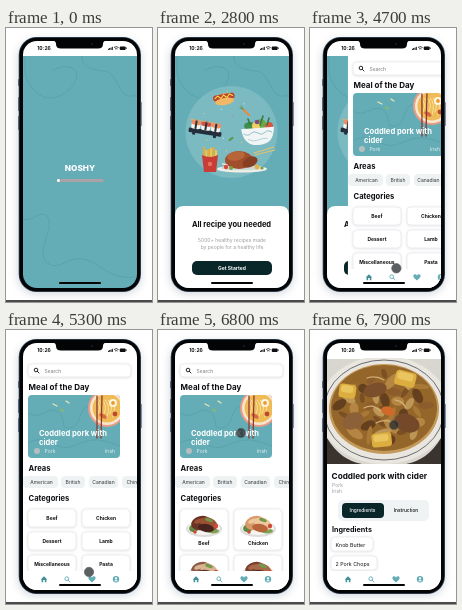
An HTML page that plays this animation: 146 px wide and 274 px high, repeating every 8 s.

```html
<!DOCTYPE html>
<html lang="en">
<head>
<meta charset="utf-8">
<style>
html, body { margin: 0; width: 100%; height: 100%; overflow: hidden; background: #fff }
svg { display: block; width: 100%; height: 100% }
text { font-family: Inter, "Open Sans", sans-serif }
</style>
</head>
<body>
<svg id="stage" viewBox="0 0 146 274"></svg>
<script>
const TEAL = '#64adb6', DARK = '#092629', INK = '#0d0f12', GREY = '#9a9ca0';

// Markup helpers
const rect = (x, y, w, h, r, fill, more = '') =>
  `<rect x="${x}" y="${y}" width="${w}" height="${h}" rx="${r}" fill="${fill}" ${more}/>`;
const dot = (x, y, r, fill, more = '') => `<circle cx="${x}" cy="${y}" r="${r}" fill="${fill}" ${more}/>`;
const oval = (x, y, rx, ry, fill, turn = 0) =>
  `<ellipse cx="${x}" cy="${y}" rx="${rx}" ry="${ry}" fill="${fill}" transform="rotate(${turn} ${x} ${y})"/>`;
const shape = (d, fill) => `<path d="${d}" fill="${fill}"/>`;
const line = (d, color, width = 1, more = '') =>
  `<path d="${d}" fill="none" stroke="${color}" stroke-width="${width}" stroke-linecap="round" ${more}/>`;
const text = (x, y, s, size, fill = INK, weight = 400, anchor = 'start') =>
  `<text x="${x}" y="${y}" font-size="${size}" fill="${fill}" font-weight="${weight}" text-anchor="${anchor}">${s}</text>`;
const mid = (x, y, s, size, fill, weight) => text(x, y, s, size, fill, weight, 'middle');
const group = (id, body, more = '') => `<g id="${id}" ${more}>${body}</g>`;
const dashes = d => line(d, '#4b929c', .5, 'stroke-dasharray="1.6 1.3"');

const upperCurves = dashes('M19 29C17 46 22 62 38 69C54 73 69 60 71 48C71 38 58 36 48 42') +
  dashes('M76 28C75 39 88 42 98 43C111 45 111 62 120 67C125 69 128 68 131 66');
const lowerCurves = dashes('M17 191C26 194 31 184 39 187C49 192 38 211 37 224C37 236 47 240 56 236C70 229 79 229 91 237C103 245 113 251 131 249');

function splash() {
  return rect(17, 28, 114, 232, 0, TEAL) + upperCurves + lowerCurves +
    mid(74, 143, 'NOSHY', 8.2, '#fff', 800) +
    rect(51, 151, 46.5, 3, 1, '#aaa3a5') +
    rect(51, 151, 3, 3, 1, '#f7f7f7', 'id="bar"');
}

function hotdog() {
  return `<g transform="rotate(-10 66 70)">` + oval(66, 71, 10, 5.5, '#e7a04b') +
    rect(55, 66, 22, 6, 3, '#b9452f') + oval(66, 73.5, 9.5, 3.6, '#f2b865') +
    line('M57 69l3-2 3 3 3-3 3 3 3-3 3 2', '#fbd748', 1.1) + '</g>';
}

function sushi() {
  let s = `<g transform="rotate(9 48 101)">` + rect(31, 102, 33, 4.5, 1, '#232d3b') + rect(35, 106, 3, 2.5, 0, '#232d3b') + rect(56, 106, 3, 2.5, 0, '#232d3b');
  for (let i = 0; i < 3; i++) {
    const x = 33 + i * 10;
    s += rect(x, 96, 9, 6.5, 2, '#f8f5ee') + rect(x - .5, 93.5, 10, 5, 2.4, i == 1 ? '#d94f40' : '#ef8e63') +
      rect(x + 3.5, 93.5, 2, 9, 0, '#2a333c');
  }
  return s + '</g>' + line('M32 91L61 96', '#d9b376', .8);
}

function salad() {
  return oval(92, 98, 6, 4, '#3f8c4c') + oval(103, 96, 5, 5, '#66a843', 25) + oval(111, 98, 4, 4, '#d9573c') +
    dot(98, 98, 4, '#f2cf62') + line('M102 97l3-9M109 97l2-7M92 96l-2-5', '#397744', 1.6) +
    dot(99, 94, 2.3, '#87477d') +
    `<g transform="rotate(-4 100 107)">` + shape('M83.5 100H116.5C115.5 113 110 117 100 117S85 112 83.5 100Z', '#f2f5f5') +
    line('M86 105q4 3 7 0t7 0 7 0 7 0', '#8fbac4', .9) + line('M90 111q5 3 10 1t9-1', '#a9cbd2', .8) + '</g>';
}

function fries() {
  let s = '';
  for (let i = 0; i < 6; i++) s += rect(47 + i * 2.4, 119 + (i * 7 % 4), 2, 13, .4, i % 2 ? '#f5c84c' : '#e9ad36');
  return s + shape('M46 127Q54 131 62 127L60 144H48Z', '#c83d35') + dot(54, 136, 2.2, '#e5735e');
}

function roast() {
  return oval(84, 141, 25, 3.6, '#f1eee7') + oval(84, 140, 21, 2.3, '#cddbd8') +
    oval(81, 132, 14, 9, '#a04e2b') + oval(78, 128, 9, 4.5, '#b9653a', -10) + oval(92, 134, 8, 5, '#873f24', -25) +
    line('M69 137l-4-1', '#f3e4cd', 1.8) + dot(68, 139, 2.2, '#d6483b') + dot(73, 140, 2, '#76a342') + dot(99, 139, 2.4, '#e4b244') + dot(104, 140, 1.6, '#76a342');
}

function welcome() {
  let crumbs = '';
  for (let i = 0; i < 16; i++) {
    const a = i * 2.4, r = 10 + i * 1.9;
    crumbs += dot(74 + r * Math.cos(a), 102 + r * Math.sin(a), .6, ['#f2cf62', '#dcecec', '#e86a4a'][i % 3]);
  }
  return rect(17, 28, 114, 232, 0, TEAL) + upperCurves +
    dot(73.5, 104, 46, '#7bbac1') + crumbs + hotdog() + sushi() + salad() +
    `<g transform="translate(-2 0)">${fries()}</g>` + roast() +
    line('M91 87L85 81', '#ec8a40', 2) + line('M85 81l-2-3M85 81l-3-1', '#58934a') +
    line('M96 125L116 119M97 127L117 122', '#e8c46a', 1) + oval(73, 111, 3, 1.3, '#5c9b50', -35) +
    shape('M17 260V187Q17 178 26 178H122Q131 178 131 187V260Z', '#fff') +
    mid(73.5, 199, 'All recipe you needed', 7.5, INK, 700) +
    mid(74, 213.5, '5000+ healthy recipes made', 5, GREY) +
    mid(74, 220.5, 'by people for a healthy life', 5, GREY) +
    rect(34, 233, 80, 14, 5, DARK) + mid(74, 242, 'Get Started', 5, '#fff', 700);
}

function nav() {
  return rect(17, 241, 114, 19, 0, '#fff') +
    shape('M34.7 249.5L38 246.3L41.3 249.5H40.4V252.3H38.8V250H37.2V252.3H35.6V249.5Z', '#438e99') +
    dot(60.8, 248.7, 1.9, 'none', `stroke="${TEAL}" stroke-width=".9"`) + line('M62.2 250.2L64 252', TEAL, .9) +
    shape('M86 252.4C79 247.8 84 244.6 86 247.4C88 244.6 93 247.8 86 252.4Z', TEAL) +
    dot(110, 249.3, 3.2, TEAL) + dot(110, 248.4, 1.1, '#fff') + shape('M108 251.3Q110 248.8 112 251.3Z', '#fff');
}

function noodles() {
  let s = dot(101, 78, 19, '#e79c86') + dot(101, 78, 17, '#f7e6d2') + dot(101, 78, 14.5, '#eebb56');
  for (let i = 0; i < 6; i++) s += line(`M${90 + i * 3} 70q6 5 2 ${14 + i % 2 * 3}`, '#fae19a', 1);
  return s + dot(107, 73, 4, '#fff5df') + dot(107, 73, 1.9, '#ee9b2e') + oval(97, 86, 4, 2, '#d9673f', 30) +
    dot(109, 84, 2.4, '#bc4a32') + line('M91 66L91 108M96 66L95 108', '#8a3830', 1.3) +
    line('M47 74l4 2M60 71l3 2', '#f3e6b0', 1.2) + oval(56, 80, 2, 1, '#8fbb5c', 30);
}

const card = (x, y, w, h) => rect(x, y, w, h, 4, '#fff', 'stroke="#e6e7ea" stroke-width=".7" filter="url(#soft)"');

function dish(x, y, i) {
  const tones = [['#6b3326', '#9a5233', '#47251e'], ['#d99a6a', '#edc79c', '#b8653c'],
    ['#8a5a44', '#d8b493', '#5a2f27'], ['#7a4030', '#a8684a', '#542a24']][i];
  return oval(x, y + 4, 18, 8, '#dedddb') + oval(x, y + 3, 16, 7, '#f6f5f2') +
    oval(x - 10, y + 3, 5, 4, '#5f8a42', -20) + oval(x + 9, y + 6, 6, 2.5, '#7fa352') +
    oval(x - 3, y - 2, 10, 7, tones[0], -15) + oval(x + 5, y - 1, 9, 6, tones[1], 25) +
    oval(x + 2, y + 3, 8, 4, tones[2], 10) + oval(x - 5, y - 4, 5, 2, tones[1], -20) +
    oval(x + 5, y - 5, 4, 1.6, '#6f9a4a', 20) + dot(x + 12, y + 1, 2.2, '#cf4a38') + dot(x - 9, y + 7, 1.8, '#cf4a38');
}

function home() {
  const names = ['Beef', 'Chicken', 'Dessert', 'Lamb', 'Miscellaneous', 'Pasta'];
  const chips = [['American', 17, 35], ['British', 55, 24], ['Canadian', 83, 29], ['Chinese', 116, 28]];
  const column = i => i % 2 ? 76 : 22, row = i => i >> 1;
  const compact = names.map((s, i) => {
    const x = column(i), y = 179 + row(i) * 23;
    return card(x, y, 48, 18) + mid(x + 24, y + 11, s, 5, INK, 700);
  }).join('');
  const full = names.slice(0, 4).map((s, i) => {
    const x = column(i), y = 179 + row(i) * 46;
    return card(x, y, 48, 41) + dish(x + 24, y + 16, i) + mid(x + 24, y + 36.2, s, 5, INK, 700);
  }).join('');
  return rect(17, 28, 114, 232, 0, '#fff') +
    card(22, 34, 103, 13) + dot(30, 40, 1.8, 'none', `stroke="${INK}" stroke-width=".9"`) + line('M31.4 41.4L33 43', INK, .9) +
    text(38.5, 42.8, 'Search', 5, '#777b80') +
    text(22.6, 60, 'Meal of the Day', 8, INK, 700) +
    `<g clip-path="url(#meal)">` + rect(22, 65, 92, 63, 0, TEAL) +
    dashes('M22 83C34 91 43 75 52 82S53 99 64 98S74 75 82 77') + dashes('M22 113C42 102 49 123 67 116S91 107 114 116') +
    noodles() + '</g>' +
    text(33, 106, 'Coddled pork with', 7.6, '#fff', 700) + text(33, 114.5, 'cider', 7.6, '#fff', 700) +
    dot(31, 121, 3, '#b5bec0') + text(38.5, 123, 'Pork', 5, '#e7f1f2') + text(109, 123, 'Irish', 5, '#e7f1f2', 400, 'end') +
    text(22.6, 140.5, 'Areas', 7.6, INK, 700) +
    chips.map(([s, x, w]) => rect(x, 146, w, 12, 4, '#eff2f3') + mid(x + w / 2 + (x < 20 ? 1 : 0), 154, s, 5, '#30363a')).join('') +
    text(22.6, 171, 'Categories', 7.6, INK, 700) +
    group('compact', compact) + group('full', full) + nav();
}

function stew() {
  let s = rect(17, 29, 114, 105, 0, '#d9d6d0') + shape('M17 108Q30 130 52 134H17ZM131 108Q118 130 96 134H131Z', '#3a332e') +
    oval(74, 80, 66, 54, '#e9e6df') + `<ellipse cx="74" cy="80" rx="60" ry="50" fill="none" stroke="#4a4b55" stroke-width=".8"/>` +
    oval(74, 79, 55, 45, '#c39a5c') + oval(74, 78, 53, 43, '#95662a');
  const tones = ['#7a4f24', '#b58643', '#8d5c2c', '#a87836', '#64401f', '#bd9657'];
  for (let i = 0; i < 40; i++) {
    const a = i * 2.4, r = Math.sqrt(i / 40);
    s += oval(74 + 46 * r * Math.cos(a), 78 + 36 * r * Math.sin(a), 5 + i % 4 * 1.5, 2.5 + i % 3, tones[i * 5 % 6], i * 37);
  }
  const potato = (x, y, w, h, turn) =>
    rect(x, y, w, h, 3.5, '#dcae3f', `transform="rotate(${turn} ${x} ${y})"`) +
    rect(x + 2, y + 1.5, w - 5, h / 2, 2.5, '#e9c45f', `transform="rotate(${turn} ${x} ${y})"`);
  return s + potato(30, 53, 17, 14, 8) + potato(61, 104, 20, 14, -6) + potato(87, 39, 21, 15, 14) +
    oval(65, 60, 12, 7, '#7c4f2c', -15) + oval(97, 93, 13, 9, '#73492a', 22) + oval(43, 91, 11, 8, '#8c6038', -25) +
    oval(78, 81, 7, 4.5, '#cf6a2a', 15) + line('M54 78q9-5 16 3M85 70q8 1 11 8M66 93q8-4 15-1M57 48q9-3 17 2', '#d0ae72', 1.3);
}

function detail() {
  return rect(17, 28, 114, 232, 0, '#fff') + rect(17, 29, 114, 105, 0, '#eef0f1') + group('photo', stew()) +
    text(21.6, 149, 'Coddled pork with cider', 8.2, INK, 700) +
    text(22, 156.5, 'Pork', 5, GREY) + text(22, 163, 'Irish', 5, GREY) +
    rect(28, 170, 91, 21, 5, '#eff3f4') + rect(32, 173, 42, 15, 4, DARK) +
    mid(52.5, 182.4, 'Ingredients', 4.8, '#fff', 500) + mid(96, 182.4, 'Instruction', 4.8, INK, 500) +
    text(22, 201.5, 'Ingredients', 7.2, INK, 700) +
    card(21, 207, 42, 14) + text(25.5, 216.5, 'Knob Butter', 5.3) +
    card(21, 226, 46, 14) + text(25.5, 235.5, '2 Pork Chops', 5.3) + nav();
}

function statusBar() {
  let s = rect(13, 10, 121, 18, 0, '#fff') + mid(38, 22, '10:26', 5, INK, 700);
  for (let i = 0; i < 4; i++) s += rect(102 + i * 1.3, 20.8 - i * .7, .9, 1.2 + i * .7, .2, INK);
  return s + line('M108.3 19.3q2-1.6 4 0M109.3 20.8q1-.8 2 0', INK, .8) +
    rect(113.7, 18.4, 6, 3.6, 1, INK) + rect(120.2, 19.5, .6, 1.4, .2, INK);
}

const stage = document.getElementById('stage');
stage.innerHTML = `<defs>
  <clipPath id="screen">${rect(17, 13, 114, 247, 14, '#000')}</clipPath>
  <clipPath id="meal">${rect(22, 65, 92, 63, 4, '#000')}</clipPath>
  <filter id="soft" x="-20%" y="-30%" width="140%" height="170%"><feDropShadow dx="0" dy=".6" stdDeviation="1" flood-color="#555c70" flood-opacity=".2"/></filter>
  <filter id="shade" x="-20%" y="-20%" width="140%" height="140%"><feGaussianBlur stdDeviation="4"/></filter>
</defs>` +
  rect(0, 0, 146, 274, 0, '#fff') + rect(12, 12, 123, 254, 18, '#a9afbb', 'filter="url(#shade)" opacity=".5"') +
  rect(0, 272, 146, 2, 0, '#4a4a4a') +
  [[51, 7], [69, 14], [88, 14]].map(([y, h]) => rect(12, y, 1.2, h, .4, '#6c7886')).join('') +
  rect(134.7, 74, 1.1, 24, .4, '#6c7886') +
  rect(12.7, 9, 122.3, 255, 18, '#35475a') + rect(13.5, 9.8, 120.7, 253.4, 17, '#030405') +
  `<g clip-path="url(#screen)">` +
  group('splash', splash()) + group('welcome', welcome()) + group('home', home()) + group('detail', detail()) +
  statusBar() + rect(53, 254, 42, 2, 1, '#050505') + '</g>' +
  shape('M47 12.5Q50 13 50 16Q50 20.5 55 20.5H92Q97 20.5 97 16Q97 13 100 12.5Z', '#030405') +
  dot(86, 16, 1, '#17202e') +
  dot(0, 0, 4.7, '#26292b', 'id="cursor" fill-opacity=".75" stroke="#5d6163" stroke-width=".6"');

const $ = id => document.getElementById(id);
const ramp = (t, a, b) => Math.min(1, Math.max(0, (t - a) / (b - a)));
const smooth = p => p * p * (3 - 2 * p);
const easeOut = p => 1 - (1 - p) ** 3;
const show = (id, on) => $(id).style.display = on ? '' : 'none';
const slide = (id, p) => $(id).setAttribute('transform', `translate(${114 * (1 - p)} 0)`);

// Pointer stops: time, x, y
const stops = [[3700, 95, 236], [4000, 88, 240], [4500, 87, 240], [5300, 83, 242], [5700, 83, 242],
  [6600, 83, 103], [7000, 83, 103], [7700, 84, 95], [8000, 84, 95]];

function draw(t) {
  show('splash', t < 2800);
  show('welcome', t >= 2800 && t < 5000);
  show('home', t >= 4600 && t < 7500);
  show('detail', t >= 7100);
  $('bar').setAttribute('width', Math.min(46.5, 2.8 + t * .016));
  slide('home', easeOut(ramp(t, 4550, 4900)));
  slide('detail', easeOut(ramp(t, 7050, 7450)));
  show('compact', t < 6100);
  show('full', t >= 6100);
  $('photo').setAttribute('opacity', ramp(t, 7500, 7800));

  show('cursor', t >= 3700);
  const i = stops.findIndex((s, n) => n && t < s[0]);
  const [t0, x0, y0] = stops[i - 1], [t1, x1, y1] = stops[i], p = smooth(ramp(t, t0, t1));
  $('cursor').setAttribute('transform', `translate(${x0 + (x1 - x0) * p} ${y0 + (y1 - y0) * p})`);
  $('cursor').setAttribute('opacity', ramp(t, 3600, 3900));
}

function tick() {
  draw(performance.now() % 8000);
  requestAnimationFrame(tick);
}
tick();
</script>
</body>
</html>
```
